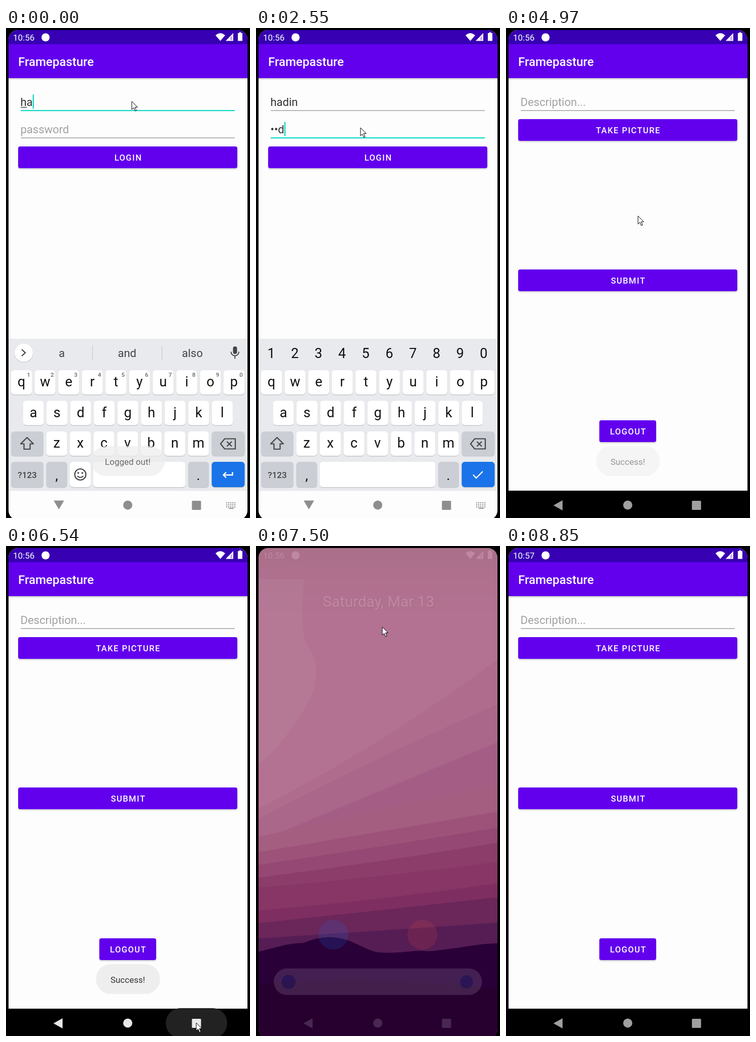
Animation, 481 px wide and 968 px high, one loop 9720 ms. Source, as an HTML page:

```html
<!DOCTYPE html>
<html lang="en">
<head>
<meta charset="utf-8">
<title>Phone demo</title>
<style>
  html, body { margin: 0; width: 100%; height: 100%; overflow: hidden; background: #000; }
  svg { display: block; width: 481px; height: 968px; font-family: Roboto, "Noto Sans", sans-serif; }
</style>
</head>
<body>
<svg id="stage" viewBox="0 0 481 968"></svg>
<script>
const LOOP = 9720, TICK = 121;
const PURPLE = '#6200ee', TEAL = '#0fd8c5', KEY_GREY = '#cbced4', INK = '#333';
const USER = 'hadin', PASSWORD = 'pedal', APP = 'Framepasture';

const stage = document.getElementById('stage');
const pen = document.createElement('canvas').getContext('2d');
const clamp = v => Math.min(1, Math.max(0, v));
const ease = v => (v = clamp(v)) * v * (3 - 2 * v);
const mix = (a, b, k) => a + (b - a) * k;

// Drawing helpers
const rect = (x, y, w, h, fill, r = 0, more = '') =>
  `<rect x="${x}" y="${y}" width="${w}" height="${h}" rx="${r}" fill="${fill}" ${more}/>`;
const circle = (x, y, r, fill) => `<circle cx="${x}" cy="${y}" r="${r}" fill="${fill}"/>`;
const path = (d, fill, more = '') => `<path d="${d}" fill="${fill}" ${more}/>`;
const line = (d, color, w = 2, more = '') => path(d, 'none', `stroke="${color}" stroke-width="${w}" ${more}`);
const text = (x, y, s, size, fill, more = '') =>
  `<text x="${x}" y="${y}" font-size="${size}" fill="${fill}" ${more}>${s}</text>`;
const mid = (x, y, s, size, fill, more = '') => text(x, y, s, size, fill, 'text-anchor="middle" ' + more);
const fade = (a, s) => a <= 0 ? '' : `<g opacity="${clamp(a)}">${s}</g>`;
const place = (t, s) => `<g transform="${t}">${s}</g>`;

const DEFS = `<defs>
  <clipPath id="screen"><rect x="5" y="4" width="471" height="968" rx="19"/></clipPath>
  <filter id="soft" x="-10%" y="-10%" width="120%" height="120%"><feGaussianBlur stdDeviation="1.6"/></filter>
  <linearGradient id="scrim" x2="0" y2="1">
    <stop offset="0" stop-color="#554" stop-opacity=".55"/>
    <stop offset="1" stop-color="#767" stop-opacity="0"/></linearGradient>
  <linearGradient id="drop" x2="0" y2="1">
    <stop offset="0" stop-opacity=".22"/><stop offset="1" stop-opacity="0"/></linearGradient>
</defs>`;

const status = time =>
  text(14, 25, time, 17, '#fff') + circle(78, 18.5, 8, '#fff') +
  path('M413 14.5Q422.500 6 432 14.500L422.500 25.500Z', '#fff') +
  path('M448 10V25.500H433Z', '#fff') + path('M446 15V24H442V19Z', PURPLE, 'opacity=".35"') +
  path('M459.500 10V8.500h4V10h2.500v15.500h-9V10Z', '#fff');

const appBar = time =>
  rect(5, 4, 471, 910, '#fdfdfd') + rect(5, 99, 471, 4, 'url(#drop)') +
  rect(5, 4, 471, 28, '#3700b3') + rect(5, 32, 471, 67, PURPLE) + status(time) +
  text(24, 75, APP, 24, '#fff', 'font-weight="500"');

function button(x, y, w, label, glow = 0) {
  return rect(x, y + 2, w, 43, '#000', 4, 'opacity=".18" filter="url(#soft)"') +
    rect(x, y, w, 43, PURPLE, 4) + rect(x, y, w, 43, '#fff', 4, `opacity="${glow}"`) +
    mid(x + w / 2 + 1, y + 28, label, 16.5, '#fff', 'font-weight="500" letter-spacing="1.45"');
}

function field(y, value, hint, focus, caret, marked = 0) {
  pen.font = '22px Roboto, "Noto Sans", sans-serif';
  const width = s => pen.measureText(s).width;
  return (value ? text(28.500, y, value, 22, INK) : text(28.500, y, hint, 22, '#a2a2a2')) +
    (marked ? rect(29, y + 2.5, width(value.slice(0, marked)), 1.3, INK) : '') +
    (focus ? rect(29, y + 8.500, 422, 2.2, TEAL) : rect(29, y + 9, 422, 1.2, '#8a8a8a')) +
    (caret ? rect(29 + width(value) - .5, y - 22, 2.4, 28, TEAL) : '');
}

function toast(label, w, a) {
  return fade(a, rect(240.5 - w / 2, 826, w, 59, '#eee', 29) + mid(240, 862.5, label, 17, INK));
}

function key(x, y, w, label, fill = '#fff', h = 48) {
  return rect(x, y + 1.5, w, h, '#c6c8cc', 6) + rect(x, y, w, h, fill, 6) +
    (label ? mid(x + w / 2, y + 32, label, 27, '#111') : '');
}

function keyboard(secret, words) {
  const pitch = 46.55;
  let s = rect(5, 614, 471, 301, '#e8eaed');
  if (secret) {
    [...'1234567890'].forEach((c, i) => s += mid(30 + i * pitch, 652, c, 27, '#111'));
  } else {
    s += circle(35, 642.5, 18.5, '#ccc') + circle(35, 641.5, 18, '#fff') +
      line('M31 635l7 6.500l-7 6.500', '#444', 2.2) +
      words.map((w, i) => mid(110 + i * 128.7, 650, w, 22, '#444')).join('') +
      rect(170, 627, 1, 29, '#c2c4c8') + rect(307, 627, 1, 29, '#c2c4c8') +
      rect(447.5, 629, 8, 15, '#444', 4) +
      line('M443.500 639.500a7.800 8 0 0 0 15.600 0M451.300 648v5.500', '#444', 2);
  }
  [['qwertyuiop', 10, 676], ['asdfghjkl', 33.5, 736.500], ['zxcvbnm', 79.5, 797]].forEach(([row, x, y]) =>
    [...row].forEach((c, i) => s += key(x + i * pitch, y, 41, c)));
  if (!secret) [...'1234567890'].forEach((c, i) =>
    s += mid(44.500 + i * pitch, 688.5, c, 11.5, '#666', 'font-weight="500"'));
  s += key(10, 797, 64, '', KEY_GREY) +
    line('M41.500 809l12.500 12.500h-6.500v10.500h-12v-10.500h-6.500Z', '#444', 2.2, 'stroke-linejoin="round"') +
    key(405.5, 797, 65, '', KEY_GREY) +
    line('M431 811.500h21v20h-21l-8-10ZM435.500 817l9.500 9.500m0-9.500l-9.500 9.500', '#444', 2.2) +
    key(10, 857, 64, '', KEY_GREY, 50) + mid(42, 888.5, '?123', 17, '#444', 'font-weight="500"') +
    key(79.5, 857, 41, '', KEY_GREY, 50) + mid(100, 893, ',', 27, '#111') +
    key(secret ? 125.500 : 172, 857, secret ? 228 : 181.5, '', '#fff', 50) +
    key(359, 857, 41, '', KEY_GREY, 50) + mid(379, 893, '.', 27, '#111') +
    key(405.5, 857, 65, '', '#1a73e8', 50);
  s += secret ? line('M428 882.500l6 6.500l13-13', '#fff', 2.3)
    : key(126, 857, 41, '', '#fff', 50) +
      `<circle cx="146.500" cy="882" r="11" fill="none" stroke="#444" stroke-width="2.200"/>` +
      circle(142.5, 879, 1.8, '#444') + circle(150.5, 879, 1.8, '#444') +
      line('M140.500 885q6 6 12 0', '#444', 2) +
      line('M446.500 877v6h-18m5.500-5.500l-5.500 5.500l5.500 5.500', '#fff', 2.4);
  return s;
}

function nav(bg, color, open) {
  let s = rect(5, 914.5, 471, 58, bg) + circle(240, 942.5, 9, color) + rect(366.5, 934, 18, 18, color, 1.5) +
    path(open ? 'M94 933.500h20.500l-10.300 17.500Z' : 'M111.500 933v20l-18-10Z', color);
  if (open) for (let i = 0; i < 15; i++)
    s += rect(434 + i % 5 * 4, 937 + Math.floor(i / 5) * 4, 2.2, 2.2, color);
  return s + (open ? rect(439, 948, 10, 1.8, color) : '');
}

const WALL = [
  ['#f19fbd', 545, 425, 245], ['#ea97b9', 565, 440, 335], ['#e08bb3', 610, 510, 410],
  ['#e08aaa', 600, 545, 495], ['#d67aa0', 630, 590, 548], ['#c96a97', 655, 620, 580],
  ['#bd5a8b', 680, 650, 610], ['#b54f84', 700, 680, 648], ['#a8437c', 745, 725, 690],
  ['#8c3873', 770, 745, 718], ['#6d2b6c', 800, 785, 768]
];
function wallpaper(dy, dim) {
  return place(`translate(0 ${dy})`, rect(0, 0, 481, 1010, '#f5a8c4') +
    path('M0 90H95Q85 190 100 220Q145 280 80 370Q40 430 0 460Z', '#f9b2cb') +
    WALL.map(([c, a, b, d]) => path(`M0 ${a}Q240 ${b} 481 ${d}V1010H0Z`, c)).join('') +
    path('M0 827C40 818 60 809 92 809C120 798 145 792 180 803C210 814 225 828 255 828' +
      'C300 828 310 822 340 825C400 820 430 810 481 809V1010H0Z', '#2b0041') +
    path('M0 890Q240 870 481 900V1010H0Z', '#270035')) +
    rect(0, 0, 481, 968, '#280028', 0, `opacity="${dim}"`);
}

const homeItems = () =>
  rect(5, 4, 471, 130, 'url(#scrim)') + status('10:56') +
  mid(242, 120.5, 'Saturday, Mar 13', 29.5, '#000', 'opacity=".3" filter="url(#soft)"') +
  mid(241.5, 119.5, 'Saturday, Mar 13', 29.5, '#fff') +
  circle(152.5, 768, 29.5, '#1a73e8') + circle(328, 768, 29.5, '#dd4f43') +
  rect(35, 834.5, 410.5, 52.5, '#d5ccdb', 26.2) + circle(64, 861, 14, '#4285f4') + circle(415, 861, 13, '#4285f4') +
  nav('none', '#fff');

const postScreen = time => appBar(time) + field(153.5, '', 'Description...', false, false) +
  button(24, 180, 432, 'TAKE PICTURE') + button(24, 477, 432, 'SUBMIT') + button(184, 775, 112, 'LOGOUT');

const recentsItems = () =>
  rect(89, 853, 15, 24, 'none', 2, 'stroke="#fff" stroke-width="2.400"') + rect(89, 852, 15, 4, '#fff') +
  rect(89, 874, 15, 4, '#fff') + line('M92.500 864v-4h4M100.500 866v4h-4', '#fff', 2) +
  text(120.5, 871.500, 'Screenshot', 17.5, '#fff') + text(332, 871.500, 'Select', 17.5, '#fff') +
  line('M296 854h25M296 862.500h7M314 862.500h7', '#fff', 2.2, 'stroke-dasharray="2.400 2"') +
  path('M305.500 859q2.500-3 5 0v8l8 3v5l-2 4h-9l-8-8l2-2l4 2Z', '#fff');

function recents(n) {
  const lift = -780 * ease((n - 58) / 3.5);
  const card = rect(67, 102, 347, 658, 'none', 0,
    'stroke="#2a1030" stroke-opacity=".36" stroke-width="7" filter="url(#soft)"') +
    (n > 56 ? place('translate(70 106) scale(.722 .7155) translate(-5 -4)', postScreen('10:56')) : '');
  return wallpaper(-29, .38) + recentsItems() + place(`translate(0 ${lift})`, card);
}

function login(n) {
  const typed = n < 1 ? 2 : n < 3 ? 3 : n < 4 ? 4 : 5;
  const onPass = n >= 12;
  const count = [17, 19, 21, 22, 23].filter(k => n >= k).length;
  const pass = count ? '•'.repeat(n < 27 ? count - 1 : count) + (n < 27 ? PASSWORD[count - 1] : '') : '';
  const words = n < 2 ? ['a', 'and', 'also'] : n < 5 ? ['had', 'have', 'has'] : [USER, 'having', 'hand'];
  const glow = n >= 34 ? .24 * clamp((37 - n) / 3) : 0;
  return appBar('10:56') +
    field(153.5, USER.slice(0, typed), 'username', !onPass, !onPass, onPass ? 0 : typed - 1) +
    field(207.5, pass, 'password', onPass, onPass && n < 27) +
    button(24, 234, 432, 'LOGIN', glow) +
    (n < 39 ? keyboard(n >= 13, words) + nav('#fdfdfd', '#8e8e8e', true) : nav('#000', '#a0a0a0')) +
    toast('Logged out!', 145, .72 - n * .36);
}

function posting(n) {
  const late = n >= 72;
  const press = n < 53 || late ? 0 : n === 53 ? .5 : 1;
  return postScreen(late ? '10:57' : '10:56') + nav('#000', late || n < 46 ? '#a0a0a0' : '#e8e8e8') +
    (press ? rect(375.5 - 60.5 * press, 913, 121 * press, 59, '#222', 29) +
      rect(366.5, 934, 18, 18, '#e8e8e8', 1.5) : '') +
    (late ? '' : toast('Success!', 126, (n - 40) / 2));
}

// Pointer stops: [step, x, y]
const STOPS = [[0, 248, 145], [7, 248, 145], [12, 206, 197], [26, 206, 197], [31, 245, 262], [37, 245, 262],
  [42, 262, 384], [43, 262, 384], [49, 385, 850], [52, 375, 942], [54, 375, 942], [56, 315, 783],
  [58, 262, 600], [61, 258, 170], [63, 240, 150]];
function pointer(n) {
  const i = STOPS.findIndex(p => p[0] > n);
  if (i < 0) return '';
  const [a, b] = [STOPS[i - 1], STOPS[i]], k = ease((n - a[0]) / (b[0] - a[0]));
  return place(`translate(${mix(a[1], b[1], k)} ${mix(a[2], b[2], k)})`,
    path('M0 0V16L3.700 12.500L6.500 19L9 18L6.300 11.500H11.300Z', '#fff', 'stroke="#000" stroke-width="1"'));
}

function scene(n) {
  if (n < 40) return login(n);
  if (n < 41) return login(n) + fade(.5, posting(n));
  if (n < 55) return posting(n);
  if (n < 56) return wallpaper(-29, .38) +
    place('translate(37 55) scale(.85) translate(-5 -4)', postScreen('10:56'));
  if (n < 62) return recents(n);
  const k = ease((n - 61) / 4);
  if (n < 72) return wallpaper(-29 * (1 - k), .38 * (1 - k)) + fade(k, homeItems());
  if (n < 73) return wallpaper(0, 0) + homeItems() +
    fade(.9, place('translate(240 520) scale(.88) translate(-240 -520)', posting(n)));
  return posting(n);
}

let shown = -1;
function frame(now) {
  const n = Math.floor((now % LOOP + 8) / TICK);
  if (n !== shown) {
    shown = n;
    stage.innerHTML = DEFS + rect(0, 0, 481, 968, '#000') +
      `<g clip-path="url(#screen)">${scene(n)}${pointer(n)}</g>`;
  }
  requestAnimationFrame(frame);
}
const start = performance.now();
const loop = () => frame(performance.now() - start);
frame = (draw => () => draw(performance.now() - start))(frame);
loop();
</script>
</body>
</html>
```
